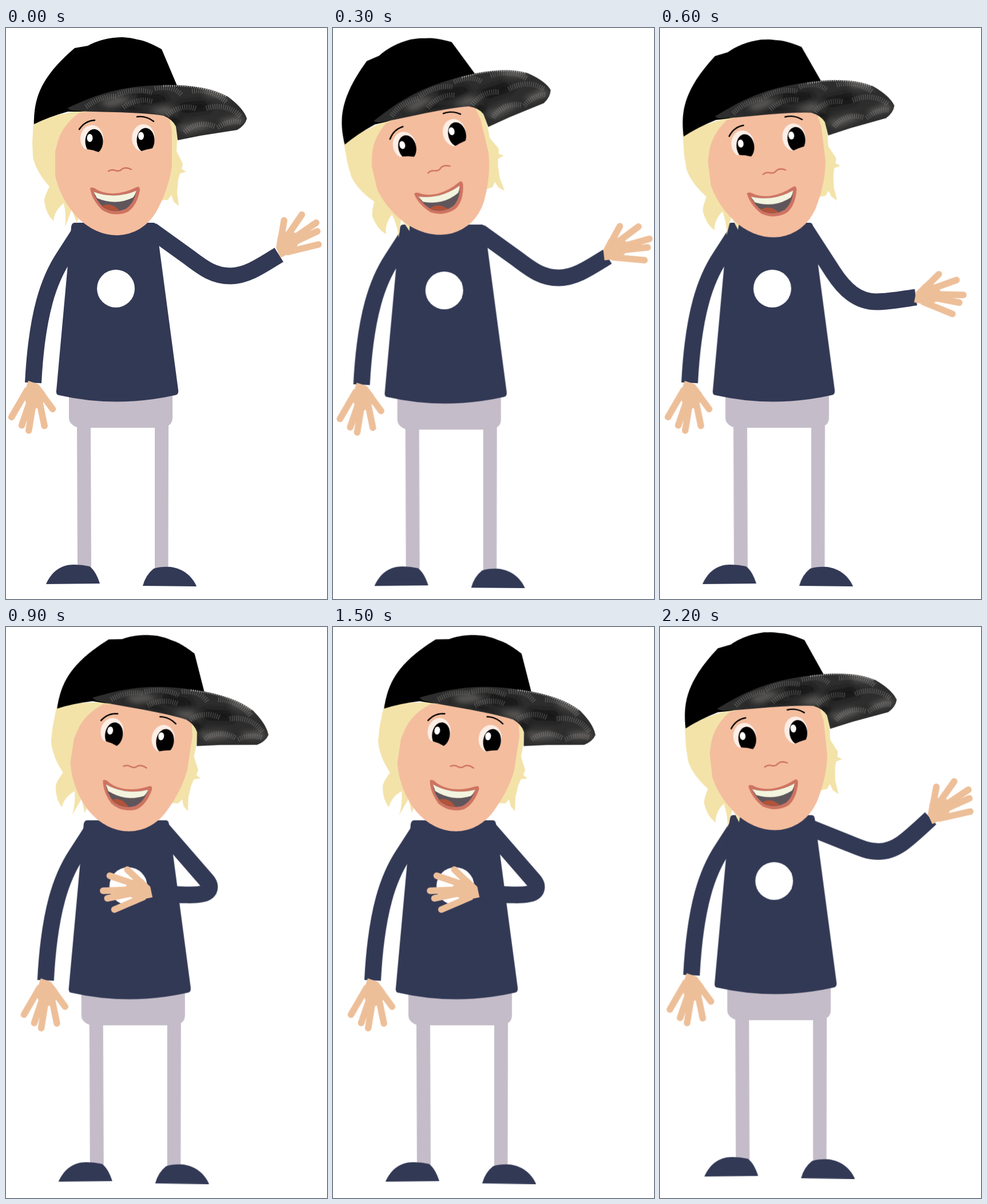
Recreate the animation shown at these times as an HTML page without scripts. Size 561 by 997 pixels, loop 2500 ms.

```html
<!DOCTYPE html>
<html lang="en">
<head>
<meta charset="utf-8">
<title>Waving boy</title>
<style>
  html, body { margin: 0; width: 100%; height: 100%; overflow: hidden; background: #fff; }
  svg { display: block; width: 100vw; height: 100vh; }

  .body, .head, .arm, .hand { animation: 2500ms step-end infinite; }
  .body { animation-name: body; }
  .head { animation-name: head; transform-origin: 235px 163px; }
  .arm  { animation-name: arm; }
  .hand { animation-name: hand; }

  /* Poses hold still and change at 0, 300, 600, 900, 1900 and 2200 ms */
  @keyframes body {
    0%, 100% { transform: translate(0, 0); }
    12% { transform: translate(2.5px, 3.2px); }
    24% { transform: translate(4.3px, 0); }
    36% { transform: translate(21.7px, -2.5px); }
    76% { transform: translate(13.5px, -4px); }
    88% { transform: translate(7.5px, -11.5px); }
  }
  @keyframes head {
    0%, 100% { transform: translate(0, 0) rotate(0deg); }
    12% { transform: translate(-34.5px, -7.3px) rotate(-13.35deg); }
    24% { transform: translate(-9.5px, -.5px) rotate(-6.8deg); }
    36% { transform: translate(39px, 2.5px) rotate(8.65deg); }
    76% { transform: translate(.5px, -4px) rotate(-6.2deg); }
    88% { transform: translate(-5.7px, -11px) rotate(-6.2deg); }
  }
  @keyframes arm {
    0%, 12%, 100% { d: path("M254,353 L318,399 C340,415 360,433 392,433 C420,433 445,416 477,396"); }
    24%, 76% { d: path("M250,352 L298,426 C318,457 341,478 374,478 C396,478 416,474 443,470"); }
    36% { d: path("M248,352 L328,444 C337,454 337,467 318,469 C308,471 293,471 240,468"); }
    88% { d: path("M247,359 L322,389 C344,398 357,403.5 374,403.5 C404,403.5 422,386 465.5,345.5"); }
  }
  @keyframes hand {
    0%, 100% { transform: translate(477px, 392px) rotate(0deg); }
    12% { transform: translate(472px, 393px) rotate(19deg); }
    24%, 76% { transform: translate(442.7px, 470px) rotate(36deg); }
    36% { transform: translate(231.3px, 465.5px) rotate(-37deg) scale(-1, 1); }
    88% { transform: translate(465.5px, 346.5px) rotate(1deg); }
  }

  .navy { fill: #323955; }
  .sleeve { fill: none; stroke: #323955; stroke-width: 29; }
  .pants { fill: #c4bcc8; }
  .skin { fill: #f4bd9e; }
  .hair { fill: #f3e3a9; }
  .eye { fill: #fdeee6; }
  .line { fill: none; stroke: #000; stroke-width: 2.4; stroke-linecap: round; }
  .lip { fill: #ce7361; }
  .nose { stroke: #ce7361; }
  .fern { fill: none; stroke: #9a9896; stroke-width: 9; stroke-dasharray: 1.3 2.4; opacity: .45; }
  .edge { stroke: #e4e2df; stroke-width: 5; opacity: .8; }
</style>
</head>
<body>
<svg viewBox="0 0 561 997">
  <defs>
    <g id="palm" fill="#edbf99" stroke-linecap="round">
      <path d="M-5,-8 L-2,-28 L15,-38 L30,-34 L36,-26 L34,-16 L28,-3 L3,9Z"/>
      <path fill="none" stroke="#edbf99" stroke-width="11.5"
        d="M4,-26 L9,-56 M12,-25 L40,-66 M16,-18 L65,-52 M18,-14 L67,-37 M16,-1 L69,-14"/>
    </g>
    <clipPath id="brim">
      <path d="M107,140 C150,120 190,103 262,100 Q345,96 388,120 Q415,140 421,158 Q418,170 404,178
        L340,188 L300,196 L297,172 Q292,160 275,153 C220,145 160,148 115,144Z"/>
    </clipPath>
    <filter id="soft"><feGaussianBlur stdDeviation="5"/></filter>
  </defs>

  <g class="body">
    <path class="pants" d="M110,635 H291 V680 Q291,690 284,694 L283.5,950 H260 V698 H148 L149,950 H125 L124,697 Q110,692 110,680Z"/>
    <path class="navy" d="M70,971 C80,948 98,936 120,937 Q133,937 146,940 Q157,948 164,970Z"/>
    <path class="navy" d="M239,974 Q244,955 258,944 Q270,940 288,941 C310,944 326,958 333,975Z"/>
    <path class="sleeve" d="M132,352 L101,400 C76,438 54,495 47.5,619.5"/>
    <use href="#palm" transform="translate(47.5 620) rotate(134)"/>
    <path class="navy" d="M120,340 H258 Q262,340 263,346 L301,632 Q302,640 296,641 Q193,664 92,641
      Q87,640 88,633 L114,347 Q115,340 120,340Z"/>
    <circle cx="192" cy="455" r="33" fill="#fff"/>
    <path class="arm sleeve" d="M254,353 L318,399 C340,415 360,433 392,433 C420,433 445,416 477,396"/>
    <g class="hand"><use href="#palm"/></g>
  </g>

  <g class="head">
    <path class="hair" d="M48,160 L46,200 L47,225 Q52,250 76,277 Q66,296 67,303 Q70,325 83,337
      Q85,318 101,306 Q106,328 103,348 L115,317 L124,341 L150,250 L150,140Z"/>
    <path class="hair" d="M270,148 L297,165 L299,195 L298,215 L309,237 L307,246 L315,251 L304,254
      L301,265 L299,287 L302,311 L293,303 L289,292 L283,300 L270,301Z"/>
    <path class="skin" d="M128,148 Q98,170 90,200 L86,216 V258 Q95,298 124,330 Q156,362 195,362
      Q238,360 262,322 Q285,280 290,240 V180 L284,152 Q200,138 128,148Z"/>

    <ellipse class="eye" cx="150" cy="193" rx="20" ry="23.5"/>
    <ellipse cx="154" cy="198" rx="15.5" ry="21.5"/>
    <ellipse cx="146.5" cy="192" rx="5" ry="7" fill="#fff"/>
    <path class="skin" d="M128,211 Q150,210 169,220 V226 H128Z"/>

    <ellipse class="eye" cx="240" cy="192" rx="20" ry="24"/>
    <ellipse cx="244" cy="196" rx="15.5" ry="21.5"/>
    <ellipse cx="236" cy="188.5" rx="5" ry="7" fill="#fff"/>
    <path class="skin" d="M220,218 L232,217 Q242,212 262,209 V222 H220Z"/>

    <path class="line" d="M128,177 Q138,162 155,161 M229,155 Q245,153 258,163"/>
    <path class="line nose" d="M179,250 Q184,246 192,249 Q199,251 203,246 Q210,242 219,247"/>

    <path class="lip" d="M147,280 Q150,276 160,283 Q190,297 228,278 Q234,275 234,283 Q229,310 213,321
      Q190,331 168,318 Q150,300 147,280Z"/>
    <path fill="#5f565c" d="M153,286 Q190,300 228,284 Q224,306 209,316 Q190,324 171,314 Q157,301 153,286Z"/>
    <path fill="#b25339" d="M167,311 Q183,303 198,318.5 Q182,321 167,311Z"/>
    <path fill="#f3f4df" d="M153,286 Q190,300 228,284 Q226,291 222,296 Q192,311 159,297Z"/>

    <path d="M49,168 C49,125 58,88 120,35 L143,31 Q168,17 203,16 Q220,17 229,20 Q245,22 272,37
      L300,103 L290,130 L130,146 L108,146 Q75,155 49,168Z"/>
    <g clip-path="url(#brim)">
      <rect x="100" y="90" width="330" height="110" fill="#2d2d2d"/>
      <g filter="url(#soft)">
        <path fill="#585655" d="M165,128 l35,-9 20,7 -40,14Z M250,144 l30,-8 16,8 -20,9Z
          M340,104 l40,8 12,14 -40,-8Z M300,172 l40,-8 20,8 -44,12Z M372,162 l36,-10 10,12 -34,6Z"/>
        <path fill="#121212" d="M225,112 l50,4 10,12 -50,6Z M300,130 l48,-4 10,18 -50,6Z
          M272,150 l36,10 -10,14Z M150,138 l70,-2 40,12Z"/>
      </g>
      <path class="fern" d="M140,138 Q165,118 195,119 M196,116 Q225,104 255,113 M205,139 Q230,121 255,128
        M260,106 Q290,99 306,116 M282,152 Q305,132 333,141 M325,110 Q360,106 386,130
        M312,182 Q335,160 365,172 M350,140 Q385,130 410,154 M370,174 Q390,160 412,165"/>
      <path class="fern edge" d="M275,100 Q345,97 386,119"/>
    </g>
  </g>
</svg>
</body>
</html>
```
